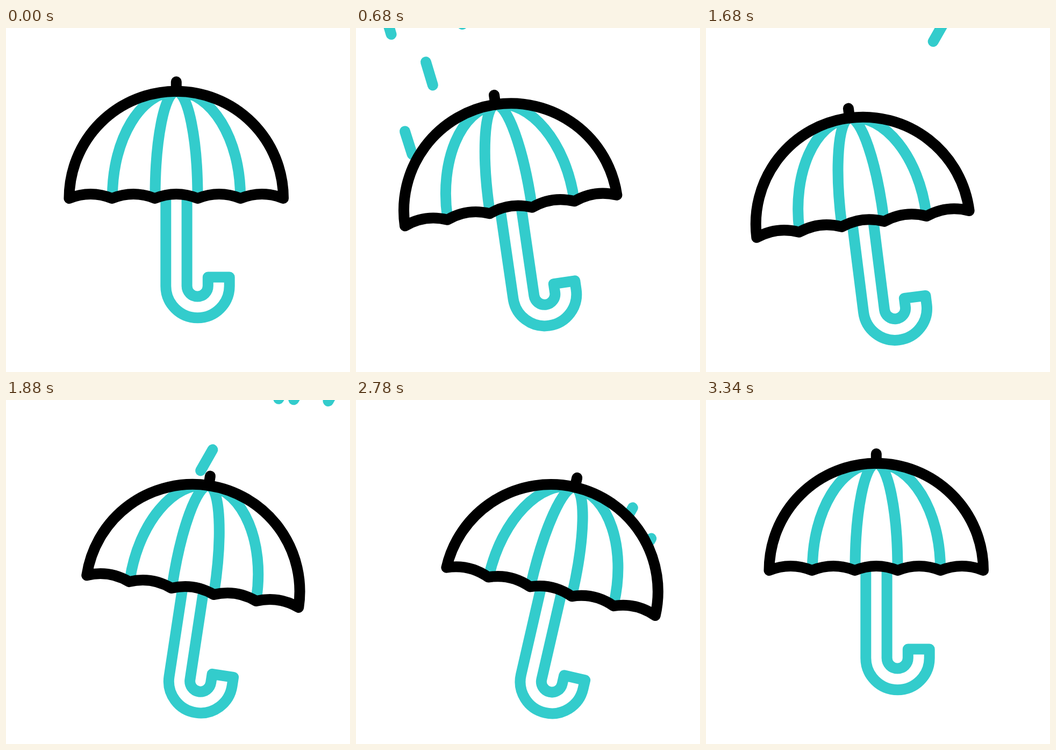
Animation of 640 by 640 pixels, one loop 3600 ms. Source, as an HTML page:

```html
<!DOCTYPE html>
<html lang="en">
<head>
<meta charset="utf-8">
<title>Umbrella in the rain</title>
<style>
  html, body { margin: 0; width: 100%; height: 100%; overflow: hidden; background: #fff; }
  svg { display: block; width: 100%; height: 100%; }
  path { stroke-width: 20; stroke-linecap: round; stroke-linejoin: round; fill: none; }
  .teal { stroke: #33cccc; }
  .black { stroke: #000; }
</style>
</head>
<body>
<svg viewBox="0 0 640 640">
  <g id="rain"></g>
  <g id="umbrella">
    <path class="teal" d="M297.3 317V480A59.2 59.2 0 0 0 415.7 480V463.5H375.8V480A19.6 19.6 0 0 1 336.6 480V317"/>
    <path id="cover" style="fill:#fff"/>
    <path class="teal" d="M198 313C198 207 251 118 316.8 118C382 118 436 207 436 313M277.5 313C277.5 207 295 118 316.8 118C338.5 118 356.5 207 356.5 313"/>
    <path class="black" id="canopy"/>
    <path class="black" d="M316.8 100V118"/>
  </g>
</svg>
<script>
const LOOP = 3600;
const PIVOT = [351.4, 517.5];
const FALL = 350, TOP = -10, DASH = 45;

// Keys: [start, end, value reached]
const LIFT = [[120, 481, -46.5], [481, 795, 42], [2880, 3340, 0]];
const TILT = [[476, 822, -13], [1540, 2000, 12.95], [2880, 3340, 0]];

// Drops: [x where the path crosses y = 0, slope, end y, start time]
const LEFT = 0.3, RIGHT = -0.57;
const DROPS = [
  [29.8, 0.318, 235, 383], [111, LEFT, 181, 507], [62, LEFT, 210, 652],
  [200, LEFT, 153, 676], [246, LEFT, 155, 734], [111, LEFT, 181, 850],
  [200, LEFT, 153, 975], [246.3, LEFT, 155, 1034],
  [437, RIGHT, 137, 1615], [506, RIGHT, 146, 1867], [535, RIGHT, 155, 1865],
  [600.6, RIGHT, 183, 1863], [522, RIGHT, 150, 2060], [570, RIGHT, 169, 2200],
  [629, RIGHT, 210, 2444], [696, RIGHT, 262, 2436]
];

const byId = id => document.getElementById(id);

// The arc is an exact half circle over the five scallops.
const scallops = 'q-39.85 -16 -79.7 0'.repeat(5);
const outline = `M117.5 317a199.25 199.25 0 0 1 398.5 0${scallops}Z`;
byId('cover').setAttribute('d', outline);
byId('canopy').setAttribute('d', outline);

const drops = DROPS.map(() => {
  const path = document.createElementNS('http://www.w3.org/2000/svg', 'path');
  path.setAttribute('class', 'teal');
  return byId('rain').appendChild(path);
});

function smooth(u) {
  u = Math.min(1, Math.max(0, u));
  return u * u * (3 - 2 * u);
}

function track(keys, t) {
  let value = 0;
  for (const [start, end, next] of keys) {
    value += (next - value) * smooth((t - start) / (end - start));
  }
  return value;
}

// A dash of fixed length slides along its path and is cut off at both ends.
function dropPath([x0, slope, endY, start], t) {
  const u = (t - start) / FALL;
  if (u <= 0 || u >= 1) return '';
  const height = DASH / Math.hypot(1, slope);
  const front = TOP + (endY - TOP + height) * u;
  const point = y => `${(x0 + slope * y).toFixed(2)} ${y.toFixed(2)}`;
  return `M${point(Math.max(TOP, front - height))}L${point(Math.min(endY, front))}`;
}

function render(t) {
  const turn = `rotate(${track(TILT, t)} ${PIVOT})`;
  byId('umbrella').setAttribute('transform', `translate(0 ${track(LIFT, t)}) ${turn}`);
  drops.forEach((path, i) => path.setAttribute('d', dropPath(DROPS[i], t)));
}

const origin = performance.now();
function tick() {
  render((performance.now() - origin) % LOOP);
  requestAnimationFrame(tick);
}
tick();
</script>
</body>
</html>
```
